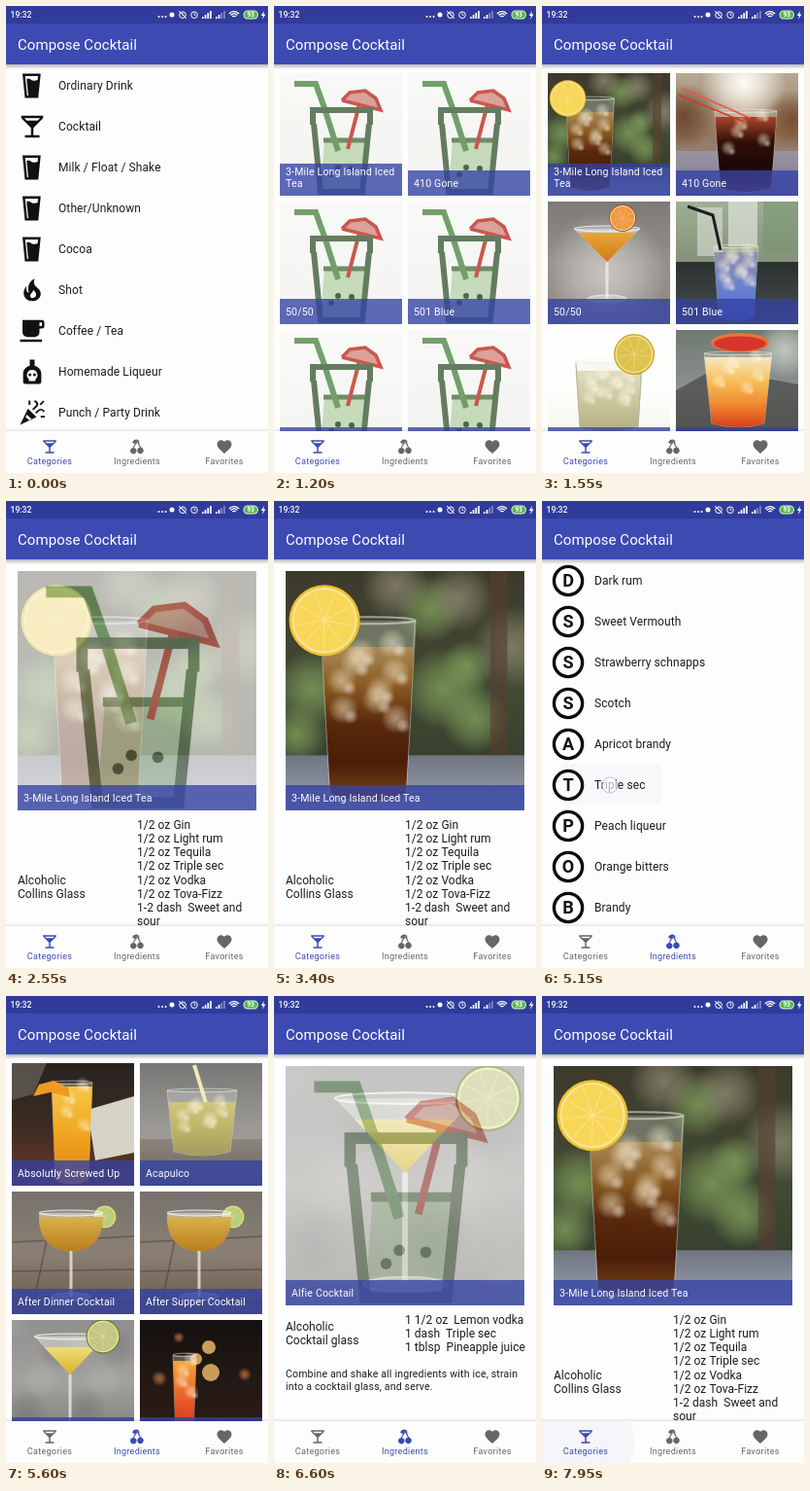
An HTML page with a canvas that plays this animation: 270x480 px, repeating every 8000 ms.

```html
<!DOCTYPE html>
<html lang="en">
<head>
<meta charset="utf-8">
<title>Cocktail app</title>
<style>
html, body { margin: 0; width: 100%; height: 100%; overflow: hidden; background: #fdfdfd; }
canvas { display: block; width: 270px; height: 480px; }
</style>
</head>
<body>
<canvas id="stage"></canvas>
<script>
const LOOP = 8000, INDIGO = '#3c4ab2', INK = '#1b1b1b', GREY = '#666';
const stage = document.getElementById('stage');
const ratio = window.devicePixelRatio || 1;
stage.width = 270 * ratio;
stage.height = 480 * ratio;
const screenCtx = stage.getContext('2d');
let g = screenCtx;

const clamp = v => Math.max(0, Math.min(1, v));
const easeOut = v => 1 - (1 - clamp(v)) ** 3;

// ---------- drawing helpers ----------
function rect(x, y, w, h, fill) { g.fillStyle = fill; g.fillRect(x, y, w, h); }

function pill(x, y, w, h, fill) {
  g.beginPath();
  g.roundRect(x, y, w, h, h / 2);
  g.fillStyle = fill;
  g.fill();
}

function oval(x, y, rx, ry, fill, stroke, width = 1) {
  g.beginPath();
  g.ellipse(x, y, rx, ry, 0, 0, Math.PI * 2);
  if (fill) { g.fillStyle = fill; g.fill(); }
  if (stroke) { g.strokeStyle = stroke; g.lineWidth = width; g.stroke(); }
}

const disc = (x, y, r, ...paint) => oval(x, y, r, r, ...paint);

function line(points, color, width) {
  g.beginPath();
  points.forEach(p => g.lineTo(...p));
  g.strokeStyle = color;
  g.lineWidth = width;
  g.stroke();
}

function poly(points, fill) {
  g.beginPath();
  points.forEach(p => g.lineTo(...p));
  g.closePath();
  g.fillStyle = fill;
  g.fill();
}

function fadeDown(y1, y2, ...colors) {
  const gradient = g.createLinearGradient(0, y1, 0, y2);
  colors.forEach((c, i) => gradient.addColorStop(i / (colors.length - 1), c));
  return gradient;
}

function text(str, x, y, size, color, { weight = 400, spacing = 0, align = 'left' } = {}) {
  g.font = `${weight} ${size}px Roboto, sans-serif`;
  g.letterSpacing = spacing + 'px';
  g.textAlign = align;
  g.fillStyle = color;
  g.fillText(str, x, y);
}

function clipped(x, y, w, h, draw) {
  g.save();
  g.beginPath();
  g.rect(x, y, w, h);
  g.clip();
  draw();
  g.restore();
}

// ---------- icons on a 24-unit grid ----------
const icons = {
  beer: 'M4 2H19L17 22H6ZM6.2 4L7.8 20H8.8L7.43 6.34C8.5 6 9.89 5.89 11 7C12.56 8.56 15.33 7.69 16.5 7.23L16.8 4Z',
  cocktail: 'M7.5 7L5.5 5H18.5L16.5 7ZM11 13V19H6V21H18V19H13V13L21 5V3H3V5Z',
  fire: 'M14 2.5C13 5 13.3 7.3 15 8.9C17.5 11 19.3 12.8 19 15.5C18.6 19 15.6 21 12 21C8 21 5 18.2 5 14.4C5 12 6 10 7.4 8.6C6.8 10.5 7 12.3 8.2 13.8C9 14.4 9.4 13.8 9.1 13.2C8 9 9.5 4.5 14 2.5ZM14.6 17.4C16 15.8 15 13.8 12.8 11.8C13 13.6 11 14.4 10.4 16C9.7 18.4 12.6 19.6 14.6 17.4Z',
  coffee: 'M2 21H20V19H2ZM20 8H18V5H20ZM20 3H4V13A4 4 0 0 0 8 17H14A4 4 0 0 0 18 13V10H20A2 2 0 0 0 22 8V5C22 3.9 21.1 3 20 3Z',
  bottle: 'M10 2H14V7C17.5 8 19.5 10.5 19.5 13.5V20A2 2 0 0 1 17.5 22H6.5A2 2 0 0 1 4.5 20V13.5C4.5 10.5 6.5 8 10 7ZM12 10.5A4.2 4.2 0 0 0 9.3 18V19.5H14.7V18A4.2 4.2 0 0 0 12 10.5ZM8.9 14.4a1.2 1.2 0 1 0 2.4 0a1.2 1.2 0 1 0-2.4 0ZM12.7 14.4a1.2 1.2 0 1 0 2.4 0a1.2 1.2 0 1 0-2.4 0Z',
  popper: 'M2 22L8.5 8.5L15.5 15.5ZM7.5 13.5L6.5 15.5L10 18.5L12 17.5ZM12 9L15 6C16 5 15 3.5 13.5 3L14 1.8C16.5 2.2 18 5 16.2 7L13 10ZM14.5 11.5L17 9.5C19 8 21.5 9 22.5 11L21.3 11.6C20.5 10 19 9.5 18 10.5L15.5 12.7ZM18 5L21 2L22 3L19 6ZM9 2H10.5V5.5H9ZM19 14.5H22.5V16H19Z',
  cherry: 'M7 13.2a4.4 4.4 0 1 0 .1 0ZM16.6 12.8a4.4 4.4 0 1 0 .1 0ZM15 3.5C11 5 8 8.5 6.5 13.2H8C9.5 9.5 11 7.5 13 6.5C13.5 9 14.5 11 16 12.8H17.6C15.5 10 14.8 7 15 3.5ZM14.5 3C11 .8 7 2 5.5 6C8 8.8 11 8 14.5 3Z',
  heart: 'M12 21.35L10.55 20C5.4 15.36 2 12.27 2 8.5C2 5.41 4.42 3 7.5 3C9.24 3 10.91 3.81 12 5.08C13.09 3.81 14.76 3 16.5 3C19.58 3 22 5.41 22 8.5C22 12.27 18.6 15.36 13.45 20Z'
};
for (const name in icons) icons[name] = new Path2D(icons[name]);

function icon(name, x, y, scale, color) {
  g.save();
  g.translate(x, y);
  g.scale(scale, scale);
  g.fillStyle = color;
  g.fill(icons[name], 'evenodd');
  g.restore();
}

// ---------- pictures on a 126-unit square ----------
const backdrop = (...colors) => rect(0, 0, 126, 126, fadeDown(0, 126, ...colors));

function blob(x, y, r, rgb, alpha = 0.8) {
  const gradient = g.createRadialGradient(x, y, 0, x, y, r);
  gradient.addColorStop(0, `rgba(${rgb},${alpha})`);
  gradient.addColorStop(0.5, `rgba(${rgb},${alpha * 0.6})`);
  gradient.addColorStop(1, `rgba(${rgb},0)`);
  disc(x, y, r, gradient);
}

function slice(x, y, r, rind, flesh) {
  disc(x, y, r, rind);
  disc(x, y, r * 0.93, '#f6e39a');
  disc(x, y, r * 0.86, flesh);
  for (let i = 0; i < 9; i++) {
    const a = i * Math.PI * 2 / 9 + 0.2;
    line([[x, y], [x + Math.cos(a) * r * 0.8, y + Math.sin(a) * r * 0.8]], 'rgba(255,240,180,.4)', r * 0.04);
  }
}

// A tapered tumbler: half widths around cx, filled from level down, with soft ice highlights.
function tumbler(cx, top, bottom, halfTop, halfBottom, level, colors, ice = 8) {
  const halfAt = y => halfTop + (halfBottom - halfTop) * (y - top) / (bottom - top);
  const body = (y, fill, stroke) => {
    const w = halfAt(y);
    g.beginPath();
    g.moveTo(cx - w, y);
    g.lineTo(cx - halfBottom, bottom - 4);
    g.quadraticCurveTo(cx, bottom + 4, cx + halfBottom, bottom - 4);
    g.lineTo(cx + w, y);
    g.fillStyle = fill;
    g.fill();
    if (stroke) { g.strokeStyle = stroke; g.lineWidth = 1; g.stroke(); }
  };
  body(top, 'rgba(225,230,215,.3)', 'rgba(240,240,235,.4)');
  body(level, fadeDown(level, bottom, ...colors));
  for (let i = 0; i < ice; i++) {
    const x = cx + Math.sin(i * 2.4 + 1) * halfAt(level) * 0.62;
    const y = level - 2 + (i / ice) * (bottom - level) * 0.55;
    blob(x, y, 8, '255,245,215', 0.5);
    blob(x + 4, y + 4, 4, '255,255,250', 0.45);
  }
  oval(cx, top, halfTop, 1.8, null, 'rgba(240,240,235,.55)');
}

function stemGlass(cx, half, rim, tip, foot, level, color, round) {
  const bowl = y => {
    const w = half * (tip - y) / (tip - rim);
    g.beginPath();
    if (round) {
      g.moveTo(cx - half, y);
      g.bezierCurveTo(cx - half, tip - 4, cx - 12, tip, cx, tip);
      g.bezierCurveTo(cx + 12, tip, cx + half, tip - 4, cx + half, y);
    } else {
      g.moveTo(cx - w, y); g.lineTo(cx, tip); g.lineTo(cx + w, y);
    }
    g.closePath();
  };
  bowl(rim);
  g.fillStyle = 'rgba(245,245,235,.45)';
  g.fill();
  bowl(level);
  g.fillStyle = color;
  g.fill();
  line([[cx, tip], [cx, foot]], 'rgba(240,240,235,.75)', 3);
  oval(cx, foot, half * 0.6, 4, 'rgba(240,240,235,.4)', 'rgba(255,255,255,.6)');
  oval(cx, rim, half, 3, 'rgba(255,255,255,.2)', 'rgba(255,255,255,.8)');
}

function coupe() {
  backdrop('#77716c', '#8b7f74', '#665746');
  for (let i = 0; i < 3; i++) line([[0, 52 + i * 30], [126, 46 + i * 34]], 'rgba(50,42,35,.4)', 1.5);
  line([[36, 50], [20, 126]], 'rgba(50,42,35,.4)', 1.5);
  slice(96, 26, 12, '#6f9a3f', '#b9cc7c');
  stemGlass(61, 33, 22, 61, 108, 26, fadeDown(24, 61, '#d9b551', '#b97e1c'), true);
}

const photos = {
  longIsland() {
    backdrop('#3d3a2c', '#414a33', '#30382a');
    [[14, 62, 20], [84, 62, 22], [100, 78, 18], [76, 20, 18], [6, 86, 16], [96, 50, 14]].forEach(p => blob(...p, '128,160,92', 0.8));
    [[58, 8, 18], [92, 14, 18], [120, 40, 22]].forEach(p => blob(...p, '150,146,122', 0.7));
    rect(108, 0, 9, 98, 'rgba(88,62,48,.6)');
    rect(0, 97, 126, 29, fadeDown(97, 126, '#6f7580', '#9ca1b4'));
    tumbler(43.5, 26, 121, 25, 20, 40, ['#a98a58', '#8a5a22', '#59280c', '#4a1d08', '#7a4518'], 9);
    slice(20.5, 26, 18.7, '#f0c22a', '#f8d658');
  },
  gone() {
    backdrop('#b7a994', '#94795f', '#8d8a9c');
    blob(70, 10, 44, '255,252,245', 1);
    blob(8, 44, 34, '96,58,32');
    blob(120, 48, 30, '110,64,36');
    rect(0, 80, 126, 46, fadeDown(80, 126, '#9a94a0', '#777a94'));
    tumbler(72, 39, 122, 32, 26, 45, ['#a8472a', '#320e08', '#1d0806', '#6d2a18'], 5);
    line([[2, 22], [70, 50]], '#d53a2a', 1.8);
    line([[8, 16], [76, 46]], '#e65a42', 1.8);
  },
  fifty() {
    backdrop('#7d7a78', '#938f8b', '#8b8783');
    blob(60, 74, 64, '215,210,204', 0.8);
    stemGlass(61, 34, 28, 62, 100, 32, fadeDown(30, 62, '#eaa93c', '#d07a14'));
    slice(77, 17, 14, '#b9481c', '#ee9a45');
  },
  blue() {
    backdrop('#9fb096', '#849079', '#3a413c');
    rect(22, 6, 26, 50, 'rgba(225,232,222,.55)');
    rect(54, 0, 30, 46, 'rgba(235,238,232,.6)');
    rect(90, 0, 36, 52, 'rgba(120,150,112,.6)');
    rect(0, 62, 126, 64, fadeDown(62, 126, '#2b302e', '#4a5054'));
    tumbler(62, 46, 122, 23, 18, 52, ['#8f92b0', '#6b80cc', '#4a6ad8'], 10);
    line([[12, 5], [38, 14], [46, 50]], '#1e1e20', 3);
  },
  lemonade() {
    backdrop('#fefefe', '#fdfdfb', '#f4f2ea');
    tumbler(63, 32, 104, 35, 30, 42, ['#dcdcc0', '#cbc79d', '#b3ae82'], 14);
    line([[29, 34], [33, 100], [93, 100], [97, 34]], '#b5b5a2', 1);
    slice(89, 25, 21, '#c9a528', '#dcc34e');
  },
  sunrise() {
    backdrop('#6f7a72', '#8d9290', '#5b5c58');
    poly([[0, 62], [40, 40], [126, 56], [126, 126], [0, 126]], 'rgba(70,72,70,.7)');
    blob(112, 20, 30, '225,225,220', 0.7);
    tumbler(64, 24, 100, 35, 27, 28, ['#f6e6c4', '#f6c05a', '#f08a30', '#d8401c'], 6);
    oval(66, 13, 30, 10, '#e8743a');
    oval(66, 14, 27, 7.5, '#d8342c');
  },
  screwed() {
    backdrop('#262320', '#3c2b22', '#6a3a26');
    poly([[78, 48], [126, 34], [126, 92], [86, 100]], '#d5d3c6');
    poly([[0, 0], [36, 0], [22, 32], [0, 38]], '#56514b');
    tumbler(62, 20, 124, 21, 17, 24, ['#f6c648', '#f0a51e', '#dd8315'], 4);
    poly([[22, 34], [28, 22], [43, 18], [58, 25], [60, 35], [40, 30]], '#f09a22');
  },
  acapulco() {
    backdrop('#777775', '#9a9894', '#aba49b');
    rect(0, 78, 126, 48, fadeDown(78, 126, '#8c857c', '#69635c'));
    line([[56, 2], [69, 44]], '#f3e9b0', 4);
    tumbler(64, 28, 95, 36, 29, 40, ['#cdc77e', '#bdb468', '#a39c62'], 8);
  },
  coupe,
  alfie(large) {
    backdrop('#8f8f8e', '#a3a19e', '#7d7b78');
    for (let i = 0; i < 9; i++) blob((i * 47) % 126, (i * 31) % 126, 22, i % 2 ? '70,70,70' : '205,205,200', 0.22);
    stemGlass(large ? 63 : 60, 37, 17, 56, 115, 28, fadeDown(28, 56, '#eedc80', '#d9b423'));
    slice(large ? 107 : 94, 17, 17.5, '#5f7f27', '#c2c884');
  },
  party() {
    backdrop('#14100f', '#241915', '#2c1b15');
    [[71, 28, 7], [58, 40, 6], [73, 54, 9]].forEach(p => disc(...p, 'rgba(245,190,110,.8)'));
    [[20, 60, 8], [108, 56, 7], [40, 18, 6]].forEach(p => blob(...p, '200,120,70'));
    tumbler(46, 36, 124, 12, 9, 42, ['#f3a53b', '#ea5a26', '#ba2a1b'], 4);
  },
  placeholder() {
    backdrop('#fafaf8', '#f4f4f2');
    poly([[46, 69], [91, 69], [86, 121], [42, 121]], '#c6dcbb');
    line([[45, 69], [90, 69]], '#6f8c66', 5);
    line([[15, 11], [37, 11], [46, 36], [60, 80]], '#72a06a', 6);
    line([[82, 32], [70, 78]], '#c95850', 4);
    poly([[64, 28], [72, 20], [88, 18], [99, 26], [104, 38]], '#dca29a');
    line([[64, 28], [72, 20], [88, 18], [99, 26], [104, 38], [64, 28]], '#c95850', 3.5);
    line([[35, 52], [42, 122], [85, 122], [92, 52]], '#647c60', 6);
    line([[34, 53], [34, 38], [93, 38], [93, 53]], '#647c60', 6);
    [[53, 104], [60, 97], [74, 98]].forEach(p => disc(...p, 3, '#4c6649'));
  }
};

const cache = {};
function picture(name, size) {
  const key = name + size;
  if (!cache[key]) {
    const canvas = document.createElement('canvas');
    canvas.width = canvas.height = size * ratio;
    g = canvas.getContext('2d');
    g.scale(size * ratio / 126, size * ratio / 126);
    photos[name](size > 126);
    g = screenCtx;
    cache[key] = canvas;
  }
  return cache[key];
}

function card(photo, lines, x, y, size, loaded) {
  if (loaded < 1) g.drawImage(picture('placeholder', size), x, y, size, size);
  g.globalAlpha = loaded;
  g.drawImage(picture(photo, size), x, y, size, size);
  g.globalAlpha = 1;
  const height = lines.length > 1 ? 33 : 26, bottom = y + size;
  rect(x, bottom - height, size, height, 'rgba(52,66,165,.78)');
  lines.forEach((l, i) => text(l, x + 6, bottom - 9 - 12 * (lines.length - 1 - i), 10.5, '#fff', { spacing: 0.19 }));
}

// ---------- content ----------
const categories = [
  ['beer', 'Ordinary Drink'], ['cocktail', 'Cocktail'], ['beer', 'Milk / Float / Shake'],
  ['beer', 'Other/Unknown'], ['beer', 'Cocoa'], ['fire', 'Shot'], ['coffee', 'Coffee / Tea'],
  ['bottle', 'Homemade Liqueur'], ['popper', 'Punch / Party Drink']
];
const ingredients = ['Light rum', 'Applejack', 'Gin', 'Dark rum', 'Sweet Vermouth', 'Strawberry schnapps',
  'Scotch', 'Apricot brandy', 'Triple sec', 'Peach liqueur', 'Orange bitters', 'Brandy', 'Lemon vodka'];
const ordinaryDrinks = [
  ['longIsland', '3-Mile Long Island Iced', 'Tea'], ['gone', '410 Gone'], ['fifty', '50/50'],
  ['blue', '501 Blue'], ['lemonade', ''], ['sunrise', '']
];
const tripleSecDrinks = [
  ['screwed', 'Absolutly Screwed Up'], ['acapulco', 'Acapulco'], ['coupe', 'After Dinner Cocktail'],
  ['coupe', 'After Supper Cocktail'], ['alfie', ''], ['party', '']
];
const longIsland = {
  photo: 'longIsland', name: '3-Mile Long Island Iced Tea', kind: ['Alcoholic', 'Collins Glass'],
  parts: ['1/2 oz Gin', '1/2 oz Light rum', '1/2 oz Tequila', '1/2 oz Triple sec', '1/2 oz Vodka',
    '1/2 oz Tova-Fizz', '1-2 dash  Sweet and', 'sour', '1 wedge  Lemon', ''],
  steps: []
};
const alfie = {
  photo: 'alfie', name: 'Alfie Cocktail', kind: ['Alcoholic', 'Cocktail glass'],
  parts: ['1 1/2 oz  Lemon vodka', '1 dash  Triple sec', '1 tblsp  Pineapple juice'],
  steps: ['Combine and shake all ingredients with ice, strain', 'into a cocktail glass, and serve.']
};

// ---------- screens ----------
const rowText = (label, y) => text(label, 54, y + 4.2, 12, INK, { spacing: 0.1 });

function categoryList() {
  categories.forEach(([name, label], i) => {
    const y = 82 + i * 42;
    icon(name, 12, y - 15, 1.25, '#111');
    rowText(label, y);
  });
}

function ingredientList(scroll) {
  ingredients.forEach((label, i) => {
    const y = 82 + i * 42 - scroll;
    disc(27, y, 14.6, '#fff', '#0c0c0c', 3.4);
    text(label[0], 27, y + 6.3, 18, '#111', { weight: 700, align: 'center' });
    rowText(label, y);
  });
}

function grid(drinks, age) {
  drinks.forEach(([photo, ...lines], i) =>
    card(photo, lines, 6 + (i % 2) * 132, 69 + (i >> 1) * 132, 126, clamp(age / 300)));
}

function detail(drink, age) {
  card(drink.photo, [drink.name], 12, 72, 246, clamp(age / 300));
  const top = 336.5, pitch = 14.28;
  const kindTop = top + (drink.parts.length - drink.kind.length) * pitch / 2;
  const column = (lines, x, y) => lines.forEach((l, i) => text(l, x, y + i * pitch, 12, INK, { spacing: 0.04 }));
  column(drink.parts, 135, top);
  column(drink.kind, 12, kindTop);
  drink.steps.forEach((s, i) => text(s, 12, 391.5 + i * 13, 10.5, INK, { spacing: 0.19 }));
}

function topBar() {
  rect(0, 60, 270, 5, fadeDown(60, 65, 'rgba(0,0,0,.28)', 'rgba(0,0,0,0)'));
  rect(0, 0, 270, 60, INDIGO);
  rect(0, 0, 270, 18, '#303b9b');
  text('Compose Cocktail', 12, 45, 15, '#fff', { spacing: 0.06 });
  text('19:32', 4.5, 12.2, 8.6, '#fff', { weight: 500 });
  for (let i = 0; i < 3; i++) disc(157.5 + i * 3.5, 11, 1, '#fff');
  disc(171, 9, 2.5, '#fff');
  [182, 194].forEach(x => {
    disc(x, 9.2, 3.3, null, '#fff', 1);
    line([[x, 7], [x, 9.4], [x + 1.5, 9.4]], '#fff', 0.8);
  });
  line([[178, 5], [186, 13]], '#fff', 1);
  [202, 216].forEach(x => {
    for (let i = 0; i < 4; i++) rect(x + i * 2.7, 11 - i * 2, 1.7, 2 + i * 2, i > 1 && x > 210 ? 'rgba(255,255,255,.4)' : '#fff');
  });
  [2.2, 4.5, 6.8].forEach(r => {
    g.beginPath();
    g.arc(235, 12.5, r, -Math.PI * 0.77, -Math.PI * 0.23);
    g.strokeStyle = '#fff';
    g.lineWidth = 1.3;
    g.stroke();
  });
  pill(244.5, 4.5, 15.5, 9, '#e8f4e4');
  pill(245.5, 5.5, 13.5, 7, '#55b848');
  text('93', 252.3, 11.4, 6.5, '#fff', { weight: 700, align: 'center' });
  poly([[266, 5], [262.8, 10], [265, 10], [264, 14], [267.5, 8.5], [265.4, 8.5]], '#fff');
}

function navBar(selected) {
  rect(0, 434, 270, 3, fadeDown(434, 437, 'rgba(0,0,0,0)', 'rgba(0,0,0,.1)'));
  rect(0, 437, 270, 43, '#fdfdfe');
  [['cocktail', 'Categories'], ['cherry', 'Ingredients'], ['heart', 'Favorites']].forEach(([name, label], i) => {
    const x = 45 + i * 90, color = i === selected ? INDIGO : GREY;
    icon(name, x - 9, 444, 0.75, color);
    text(label, x, 471, 9, color, { spacing: 0.3, align: 'center' });
  });
}

// ---------- timeline ----------
const scrollAt = t => 126 * easeOut((t - 4500) / 550);

const scenes = [
  { at: 0, tab: 0, draw: () => categoryList() },
  { at: 1150, tab: 0, draw: t => grid(ordinaryDrinks, t - 1200) },
  { at: 2420, tab: 0, draw: t => detail(longIsland, t - 2450) },
  { at: 3850, tab: 1, draw: t => ingredientList(scrollAt(t)) },
  { at: 5280, tab: 1, draw: t => grid(tripleSecDrinks, t - 5300) },
  { at: 6440, tab: 1, draw: t => detail(alfie, t - 6450) },
  { at: 7650, tab: 0, draw: t => detail(longIsland, t - 7630) }
];

// box: the pressed surface; end: when its ripple is gone
const taps = [
  { at: 950, end: 1150, x: 95, y: 84, box: [0, 61, 270, 42] },
  { at: 2300, end: 2420, x: 70, y: 130, box: [6, 69, 126, 126] },
  { at: 3700, end: 4300, x: 135, y: 458, box: [0, 437, 270, 43], reach: 50 },
  { at: 5120, end: 5280, x: 70, y: 292, box: [0, 270, 270, 42] },
  { at: 6350, end: 6440, x: 70, y: 390, box: [6, 333, 126, 104] },
  { at: 7550, end: 8150, x: 45, y: 458, box: [0, 437, 270, 43], reach: 50 }
];

const touchDot = (x, y) => disc(x, y, 8, 'rgba(255,255,255,.65)', 'rgba(150,155,190,.6)', 1);

function render(t) {
  g.setTransform(ratio, 0, 0, ratio, 0, 0);
  rect(0, 0, 270, 480, '#fdfdfd');
  const scene = scenes.filter(s => s.at <= t).pop();
  clipped(0, 60, 270, 377, () => scene.draw(t));
  topBar();
  navBar(scene.tab);
  for (const { at, end, x, y, box, reach = 200 } of taps) {
    if (t < at || t >= end) continue;
    const strength = 0.06 * clamp((end - t) / 300);
    clipped(...box, () => disc(x, y, 8 + (reach - 8) * easeOut((t - at) / 350), `rgba(50,70,120,${strength})`));
    if (t < at + 110) touchDot(x, y);
  }
  if (t >= 4450 && t < 4680) touchDot(42, 320 - scrollAt(t));
}

function tick(now) {
  render(now % LOOP);
  requestAnimationFrame(tick);
}
requestAnimationFrame(tick);
</script>
</body>
</html>
```
